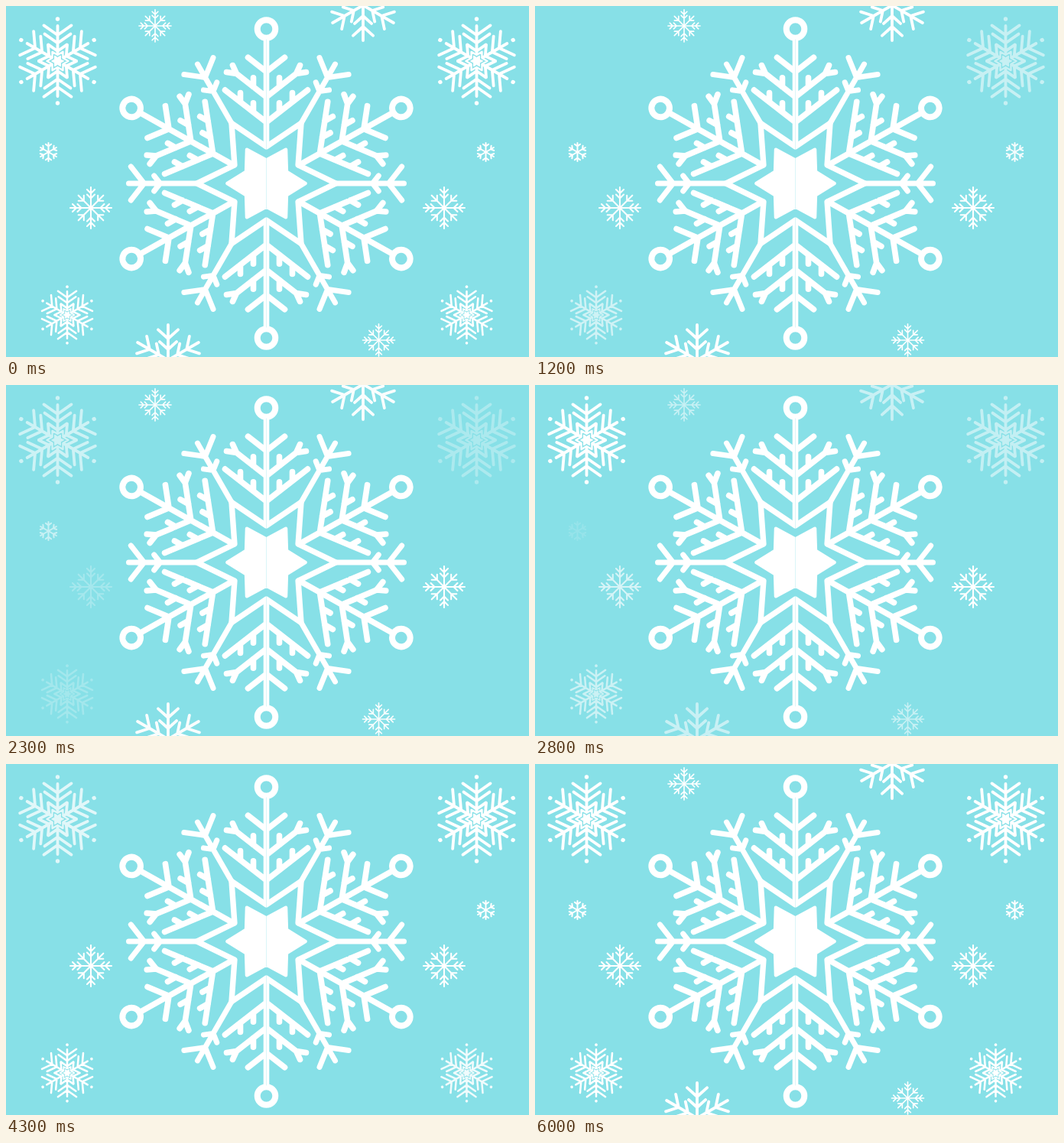
An HTML page for the animation above (6100 ms loop, 684x459 px).

```html
<!DOCTYPE html>
<html>
<head>
<meta charset="utf-8">
<title>Snowflakes</title>
<style>
html, body { margin: 0; width: 100%; height: 100%; overflow: hidden; background: #87e0e7; }
svg { display: block; }
</style>
</head>
<body>
<svg id="stage" width="684" height="459" viewBox="0 0 684 459" fill="none" stroke="#fff" stroke-linecap="round" stroke-linejoin="round"></svg>
<script>
const LOOP = 6100, STEP = 100, SLOPE = .78;
const stage = document.getElementById('stage');

const path = (d, w) => `<path d="${d}" stroke-width="${w}"/>`;
const stem = (a, b) => `M0 ${-a}V${-b}`;
// a pair of twigs leaving the stem at radius r, reaching x to both sides
const vee = (r, x, slope = SLOPE) => `M${-x} ${-r - x * slope}L0 ${-r}L${x} ${-r - x * slope}`;
const turn = (part, angle) => `<g transform="rotate(${angle})">${part}</g>`;

function spin(part, count, from = 0) {
  let out = '';
  for (let i = 0; i < count; i++) out += turn(part, from + i * 360 / count);
  return out;
}

function star(outer, inner) {
  const pts = [];
  for (let i = 0; i < 12; i++) {
    const a = i * Math.PI / 6, r = i % 2 ? inner : outer;
    pts.push((r * Math.cos(a)).toFixed(2) + ' ' + (r * Math.sin(a)).toFixed(2));
  }
  return 'M' + pts.join('L') + 'Z';
}

function bigArm() {
  let d = stem(49, 188);
  for (let i = 0; i < 3; i++) {
    const r = 146 - 33 * i;
    d += vee(r, 24 + 15 * i);
    for (const s of [-1, 1]) {
      for (let j = 1; j <= i; j++) d += `M${s * 17 * j} ${-r - 17 * j * SLOPE}v-12`;
      if (i === 1) d += `M${s * 39} ${-r - 39 * SLOPE}l${s * 5} -11m${s * -5} 11l${s * 13} -2`;
    }
  }
  return path(d, 7.6) + '<circle cy="-202" r="11.8" stroke-width="8"/>';
}

function bigFlake() {
  const arm = bigArm();
  const arms = [-60.8, 0, 60.8].map(a => turn(arm, a) + turn(arm, a + 180)).join('');
  const side = path(stem(91, 180) + vee(160, 22) + vee(139, 10), 7);
  return arms + spin(side, 6, 30) + path(star(91, 48), 7.4) +
    `<path d="${star(51, 30.5)}" fill="#fff" stroke-width="4.5"/>` +
    '<path d="M0 -188V188" stroke="#87e0e7" opacity=".3"/>';
}

const feather = spin(path(stem(9, 46) + vee(34, 18, .7) + vee(23.5, 17, .7) + vee(13, 12, .7), 3.8) +
    '<circle cy="-55" r="2.7" fill="#fff" stroke="none"/>', 6) +
  `<path d="${star(14, 8)}" fill="#87e0e7" stroke-width="2.4"/>` +
  `<path d="${star(8, 4.6)}" fill="#fff" stroke-width="1"/>`;
const cross = spin(path(stem(0, 27) + vee(19, 5, 1) + vee(12.5, 5, 1), 2.1), 4) +
  spin(path(stem(0, 23) + vee(13, 5, 1), 2.1), 4, 45);
const tiny = spin(path(stem(0, 12) + vee(7.5, 3.6), 2), 6);
const half = spin(path(stem(0, 46) + vee(28, 13, .9) + vee(14, 11, .9), 3.8), 6);

// fades away from time `out`, is fully there again at time `back`
const dip = (out, back, dur = 1200) => t =>
  Math.min(1, Math.max(0, 1 - (t - out) / dur, 1 - (back - t) / dur));
const late = dip(2250, 5950);

// shape, x, y, scale, dips
const flakes = [
  [feather, 67.5, 72, 1, dip(0, 2800), dip(2800, 4600)],
  [feather, 615.5, 72, 1, dip(0, 4100, 2600), dip(4500, 6000, 2400)],
  [feather, 80, 404, .67, dip(600, 3450, 1500)],
  [feather, 602.5, 404, .67, dip(0, 4450)],
  [tiny, 55.5, 191, 1, dip(1750, 5950)],
  [tiny, 627.5, 191, 1, dip(1100, 4200)],
  [cross, 111, 264, 1, dip(1150, 3200)],
  [cross, 573, 264, 1],
  [cross, 195, 26, .78, late],
  [cross, 487.5, 437, .78, late],
  [half, 467, -1, 1, late],
  [half, 212, 463, 1, late]
];

stage.innerHTML = `<g transform="translate(340.5 232)">${bigFlake()}</g>` +
  flakes.map(([shape, x, y, k]) => `<g class="flake" transform="translate(${x} ${y}) scale(${k})">${shape}</g>`).join('');
const nodes = stage.querySelectorAll('.flake');

function draw(now) {
  const t = Math.floor(now % LOOP / STEP) * STEP;
  flakes.forEach(([, , , , ...dips], i) =>
    nodes[i].setAttribute('opacity', dips.reduce((o, f) => o * f(t), 1).toFixed(3)));
}

const start = performance.now();
function tick() {
  draw(performance.now() - start);
  requestAnimationFrame(tick);
}
tick();
</script>
</body>
</html>
```
